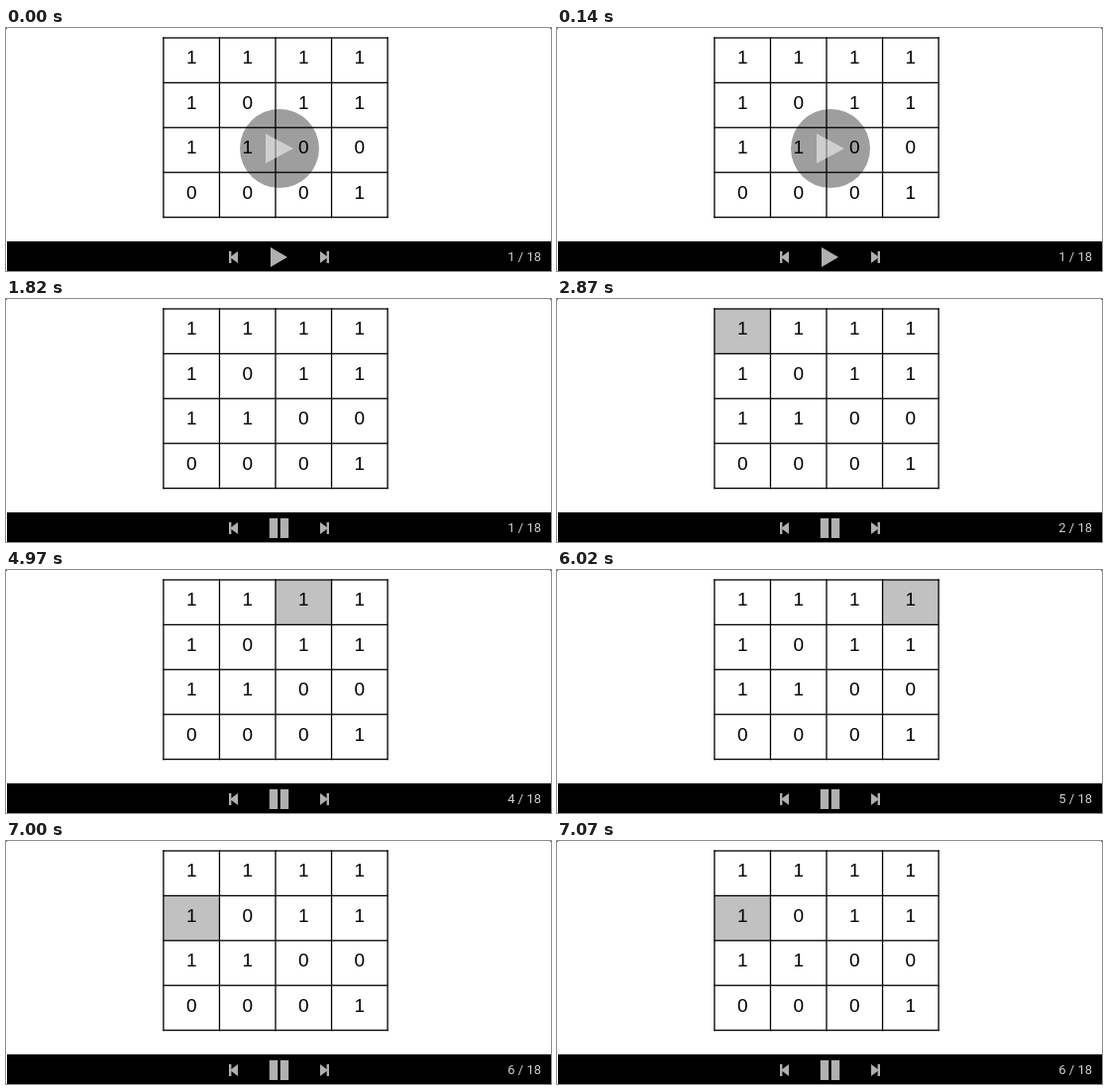
Write an HTML page with a canvas that moves like this. It is 550 by 246 pixels and loops after 8 s.

```html
<!DOCTYPE html>
<html lang="en">
<head>
<meta charset="utf-8">
<title>Matrix walk</title>
<style>
  html, body { margin: 0; width: 100%; height: 100%; overflow: hidden; background: #fff; }
  canvas { display: block; }
</style>
</head>
<body>
<canvas id="stage" width="550" height="246"></canvas>
<script>
const ctx = document.getElementById('stage').getContext('2d');
const LOOP = 8000;
const STARTED = 1820;
const STEPS = [2870, 3920, 4970, 6020, 7000];
const GRID = ['1111', '1011', '1100', '0001'];
const LEFT = 158.9, TOP = 10, CELL_W = 56.55, CELL_H = 45.4, LINE = 1.3;
const ICON = '#b0b0b0';

function rect(x, y, w, h, color) {
  ctx.fillStyle = color;
  ctx.fillRect(x, y, w, h);
}

function triangle(x, y, w, h, color) {
  ctx.fillStyle = color;
  ctx.beginPath();
  ctx.moveTo(x, y);
  ctx.lineTo(x + w, y + h / 2);
  ctx.lineTo(x, y + h);
  ctx.fill();
}

function text(str, x, y, font, color, align) {
  ctx.font = font;
  ctx.fillStyle = color;
  ctx.textAlign = align;
  ctx.fillText(str, x, y);
}

function drawGrid(active) {
  if (active >= 0) {
    const col = active % 4, row = Math.floor(active / 4);
    rect(LEFT + col * CELL_W, TOP + row * CELL_H, CELL_W, CELL_H, '#c1c1c1');
  }
  const half = LINE / 2;
  for (let i = 0; i < 5; i++) {
    rect(LEFT + i * CELL_W - half, TOP - half, LINE, 4 * CELL_H + LINE, '#000');
    rect(LEFT - half, TOP + i * CELL_H - half, 4 * CELL_W + LINE, LINE, '#000');
  }
  GRID.forEach((line, row) => [...line].forEach((digit, col) => {
    text(digit, LEFT + (col + 0.5) * CELL_W, TOP + 26.4 + row * CELL_H,
      '19px "Liberation Sans", Arial, sans-serif', '#000', 'center');
  }));
}

function drawOverlay() {
  ctx.fillStyle = 'rgba(0, 0, 0, 0.38)';
  ctx.beginPath();
  ctx.arc(276, 122, 40, 0, Math.PI * 2);
  ctx.fill();
  triangle(262, 107, 28, 30, 'rgba(255, 255, 255, 0.5)');
}

function drawControls(playing, page) {
  rect(1, 216, 549, 30, '#000');
  rect(225, 226, 2.4, 12, ICON);
  triangle(234, 226, -8, 12, ICON);
  triangle(317, 226, 8, 12, ICON);
  rect(323.6, 226, 2.4, 12, ICON);
  if (playing) {
    rect(265.8, 222, 8.4, 20, ICON);
    rect(276.8, 222, 8.4, 20, ICON);
  } else {
    triangle(267, 222, 17, 20, ICON);
  }
  text(page + ' / 18', 540, 236, '13px Roboto, sans-serif', '#d0d0d0', 'right');
}

function drawCorners() {
  for (const x of [0, 549]) rect(x, 0, 1, 1, '#555');
}

function draw(now) {
  const t = now % LOOP;
  const step = STEPS.filter(at => t >= at).length;
  const playing = t >= STARTED;
  rect(0, 0, 550, 246, '#fff');
  drawGrid(step - 1);
  if (!playing) drawOverlay();
  drawControls(playing, step + 1);
  drawCorners();
}

const start = performance.now();
function tick() {
  draw(performance.now() - start);
  requestAnimationFrame(tick);
}
tick();
</script>
</body>
</html>
```
